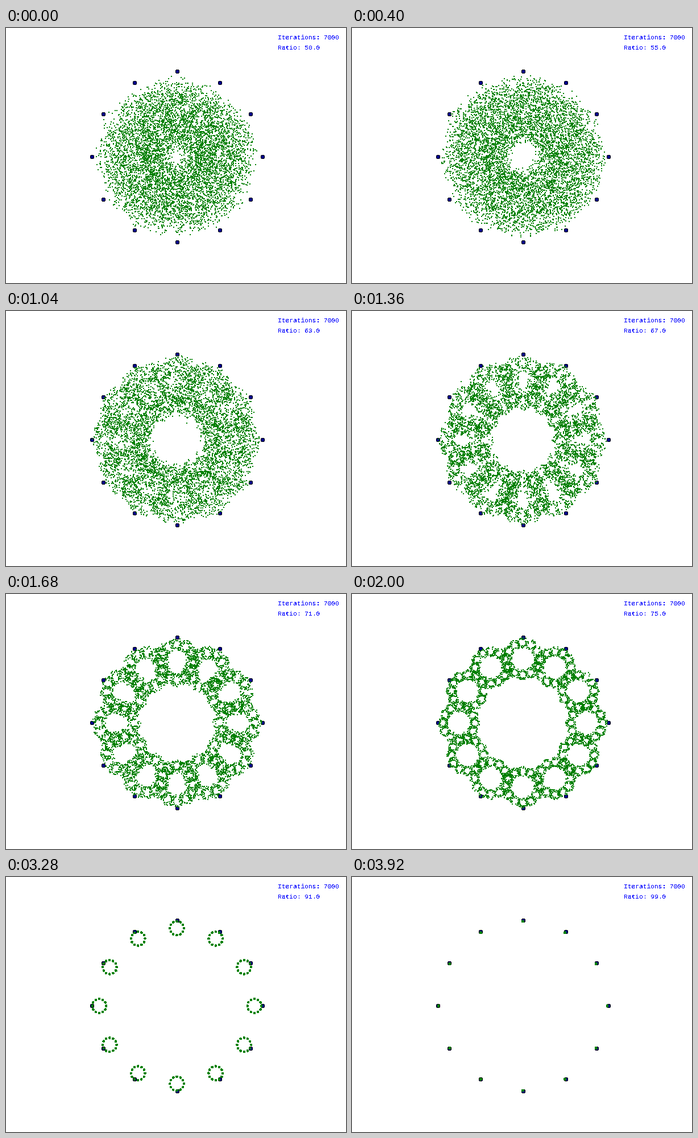
Animation, 598 px wide and 448 px high, one loop 4 s. Source, as a matplotlib script:

```python
import numpy as np
import matplotlib.pyplot as plt
from matplotlib.animation import FuncAnimation

W, H = 598, 448
CENTER = 301 + 226j
RADIUS = 150
SIDES = 12
STEPS = 7000
FRAMES, INTERVAL = 50, 80

WHITE, GREEN, NAVY, BLACK = (255, 255, 255), (0, 128, 0), (0, 0, 139), (0, 0, 0)

corners = CENTER + RADIUS * np.exp(2j * np.pi * np.arange(SIDES) / SIDES)


def to_pixels(points):
    """Whole-pixel columns and rows; the nudge absorbs rounding error."""
    return (np.floor(points.real + 1e-6).astype(int),
            np.floor(points.imag + 1e-6).astype(int))


def chaos_game(ratio, seed):
    """Jump repeatedly towards random corners by the given ratio."""
    rng = np.random.default_rng(seed)
    picks = (corners * ratio)[rng.integers(SIDES, size=STEPS)].tolist()
    pos = complex(rng.uniform(100, 500), rng.uniform(60, 400))
    keep = 1 - ratio
    path = []
    for pull in picks:
        pos = pull + keep * pos
        path.append(pos)
    return np.array(path)


def blank_stage():
    """White stage with an outlined round dot at every corner."""
    stage = np.full((H, W, 3), WHITE, dtype=np.uint8)
    rows, cols = np.mgrid[:H, :W]
    for x, y in zip(*to_pixels(corners)):
        dist = np.hypot(cols - x, rows - y)
        stage[dist < 3.7] = BLACK
        stage[dist < 2.9] = NAVY
    return stage


def plot_points(stage, points):
    """Stamp each point as a 2 x 2 pixel square."""
    x, y = to_pixels(points)
    for dx in (-1, 0):
        for dy in (0, 1):
            stage[y + dy, x + dx] = GREEN


fig = plt.figure(figsize=(W / 72, H / 72), dpi=72, facecolor="white")
ax = fig.add_axes([0, 0, 1, 1])
base = blank_stage()
image = ax.imshow(base, extent=(0, W, H, 0), interpolation="nearest", aspect="auto")
ax.set_axis_off()


def label(y, text):
    return ax.text(477.5, y, text, color="blue", family="Liberation Mono",
                   size=11.2, va="baseline", antialiased=False)


label(20, f"Iterations: {STEPS}")
ratio_label = label(38, "")


def update(i):
    percent = 50 + i
    stage = base.copy()
    plot_points(stage, chaos_game(percent / 100, seed=i))
    image.set_data(stage)
    ratio_label.set_text(f"Ratio: {percent:.1f}")
    return image, ratio_label


anim = FuncAnimation(fig, update, frames=FRAMES, interval=INTERVAL,
                     init_func=lambda: update(0), repeat=True, repeat_delay=0)
plt.show()
```
